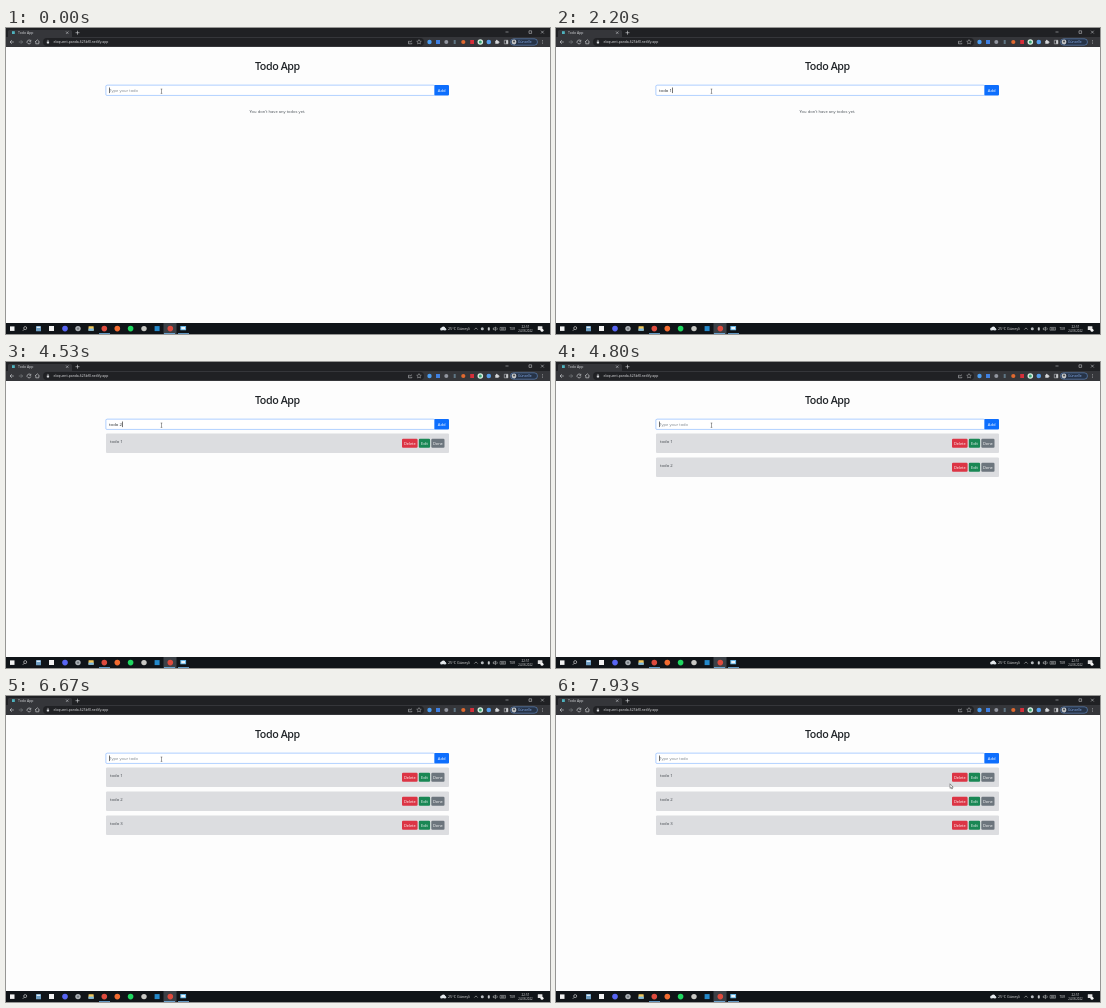
An HTML page for the animation above (8000 ms loop, 544 px wide and 306 px high).

```html
<!DOCTYPE html>
<html lang="en">
<head>
<meta charset="utf-8">
<title>Todo App</title>
<style>
  html, body { margin: 0; width: 100%; height: 100%; overflow: hidden; background: #fdfdfd; }
  svg { display: block; width: 100vw; height: 100vh; }
  text { font-family: "Open Sans", "Noto Sans", sans-serif; white-space: pre; }
</style>
</head>
<body>
<svg id="stage" viewBox="0 0 544 306"></svg>
<script>
const LOOP = 8000;
const STEP = 1000 / 15;

const rect = (x, y, w, h, fill, r = 0, more = '') =>
  `<rect x="${x}" y="${y}" width="${w}" height="${h}" rx="${r}" fill="${fill}" ${more}/>`;
const dot = (x, y, r, fill, more = '') => `<circle cx="${x}" cy="${y}" r="${r}" fill="${fill}" ${more}/>`;
const line = (d, color, w = .6) => `<path d="${d}" fill="none" stroke="${color}" stroke-width="${w}"/>`;
const label = (x, y, s, size, fill, more = '') =>
  `<text x="${x}" y="${y}" font-size="${size}" fill="${fill}" ${more}>${s}</text>`;
const mid = 'text-anchor="middle"';

function browserBar() {
  const ink = '#d5d7da';
  return rect(0, 0, 544, 19, '#202124') +
    `<path d="M2 9.5V3.5Q2 2 3.5 2H64.500Q66 2 66 3.500V9.500Z" fill="#35363a"/>` +
    rect(0, 9, 544, 10, '#35363a') +
    rect(37, 10, 381, 8, '#202124', 4) +
    rect(6, 3.2, 2.8, 2.800, '#4fb3bf') +
    label(12, 6.1, 'Todo App', 3.5, ink) +
    line('M60 3.500l2.400 2.400m0 -2.400l-2.400 2.400', ink, .5) +
    line('M69.500 4.700h4m-2 -2v4', ink, .6) +
    line('M499.500 4h3', ink, .5) +
    line('M523 2.800h2.600v2.600h-2.600z', ink, .5) +
    line('M535 2.700l2.800 2.800m0 -2.800l-2.800 2.800', ink, .5) +
    // navigation
    line('M7.800 14H4m1.800 -1.800L4 14l1.800 1.800', ink) +
    line('M12.800 14h3.800m-1.800 -1.800l1.800 1.800l-1.800 1.800', '#85888c') +
    line('M24.600 13a1.900 1.900 0 1 0 .2 1.500M24.800 11.800v1.500h-1.500', ink) +
    line('M29 14l2.300 -2.200l2.300 2.200M29.800 13.500v2.300h3v-2.300', ink) +
    rect(40.8, 13.4, 2.300, 2, ink, .3) + line('M41.300 13.500v-.7a.65 .65 0 0 1 1.300 0v.7', ink, .4) +
    label(47.5, 15.2, 'eloquent-panda-625bf0.netlify.app', 3.4, '#e4e5e7') +
    line('M403.800 13.300h-1.300v2.500h3.300v-1M404 14.500q.3 -1.500 2 -1.600', ink, .5) +
    `<path d="M413 11.600l.7 1.500l1.600 .2l-1.200 1.100l.3 1.600l-1.400 -.8l-1.400 .8l.3 -1.600l-1.200 -1.100l1.600 -.2z" fill="none" stroke="${ink}" stroke-width=".4"/>` +
    // extensions
    dot(423.5, 14, 2.2, '#4b9df0') + rect(430, 12, 4, 4, '#3f7fe0') +
    dot(440.3, 14, 2, '#9296a0') + rect(447.7, 12, 2, 4, '#5f7684') +
    dot(457.3, 14, 2.1, '#e0692f') + rect(464.2, 12, 3.8, 4, '#d62f3a') +
    dot(474.3, 14, 2.8, '#d9efe4') + dot(474.3, 14, 1.5, '#3ba676') +
    dot(482.8, 14, 2.300, '#559be8') +
    rect(489.3, 12.8, 3.300, 3, ink, .4) + dot(490.8, 12.5, .8, ink) + dot(492.8, 14.300, .7, ink) +
    line('M498.300 12.300h3.600v3.500h-3.600z', ink, .5) + rect(500.2, 12.300, 1.7, 3.5, ink) +
    rect(504.5, 10.8, 27, 6.400, '#263347', 3.200, 'stroke="#6e9fe0" stroke-width=".5"') +
    dot(508, 14, 2.4, '#c4c6c8') + dot(508, 13.500, 1, '#4a4c50') +
    label(512, 15.2, 'Güncelle', 3.4, '#8ab4f8') +
    [12.4, 14, 15.6].map(y => dot(536.5, y, .45, ink)).join('');
}

function taskbar() {
  const ink = '#e2e2e2';
  return rect(0, 295, 544, 11, '#101418') +
    rect(157.5, 295, 13, 11, '#3b4046') +
    [93, 158, 172].map(x => rect(x, 305.2, 11, .8, '#76b9ed')).join('') +
    rect(4, 298.4, 4.5, 4.5, '#f2f2f2') +
    dot(19.2, 300.1, 1.5, 'none', `stroke="${ink}" stroke-width=".6"`) + line('M18.100 301.300l-1.300 1.500', ink) +
    rect(30, 298, 5, 5.200, '#6f9fc4', .5) + rect(30.7, 298.7, 3.600, 1.300, '#dcebf5') +
    rect(43, 298, 5, 5, '#f1f1f1') +
    dot(59, 300.600, 2.800, '#5865f2') +
    dot(72, 300.600, 2.700, '#aeb3b7') + dot(72, 300.600, 1.200, '#737a80') +
    rect(82.500, 298.3, 5.2, 4.500, '#f0c65a', .4) + rect(82.500, 300.600, 5.2, 2.200, '#79b9e8') +
    dot(98.300, 300.600, 2.800, '#dd4b3e') +
    dot(111.3, 300.600, 2.800, '#f26b2f') +
    dot(124.600, 300.600, 2.800, '#1ed760') +
    dot(138, 300.600, 2.700, '#c9c9c5') +
    rect(148.600, 298.1, 5, 5, '#2489ca') +
    dot(164.300, 300.600, 2.800, '#dd4b3e') +
    rect(174.3, 298, 5.8, 4.200, '#65b7e8', .3) + rect(175.300, 299, 3.800, 2.300, '#edf5fa') +
    // tray
    dot(435.600, 301, 1.500, '#dce2e7') + dot(437.400, 300.300, 1.900, '#e8ecef') + dot(438.900, 301.200, 1.300, '#dce2e7') +
    label(442, 302.2, '25°C Güneşli', 3.7, ink) +
    line('M468.300 301.600l1.700 -1.700l1.700 1.700', ink, .5) +
    dot(476.300, 300.800, 1.500, '#b9bdc1') +
    rect(481.800, 299.2, 2, 3.2, '#c6c9cb', .7) +
    line('M487.300 300v1.600h1l1.200 1v-3.600l-1.200 1zM490.700 299.500q1 1.300 0 2.600', ink, .5) +
    line('M494 299.400h5.500v2.800h-5.500zM495 300.300h3.500m-3.500 1h3.500', ink, .4) +
    label(506.300, 302, 'TUR', 3, ink, mid) +
    label(519.500, 299.5, '22:51', 3.1, ink, mid) +
    label(519.500, 304, '24.08.2022', 2.8, ink, mid) +
    rect(531.800, 298.300, 4.600, 3.800, ink, .3) + dot(536, 302.3, 1.500, '#f7f7f7');
}

function button(x, y, w, s, fill) {
  return rect(x, y, w, 9, fill, 1.1) + label(x + w / 2, y + 5.9, s, 3.9, '#fff', mid);
}

function todoRow(i) {
  const y = 71.500 + 24 * i;
  return `<g class="row">` + rect(100, y, 343, 19.5, '#dcdde0', 1.1) +
    label(104, y + 9.7, `todo ${i + 1}`, 4.25, '#41464b') +
    button(396, y + 5.3, 15.6, 'Delete', '#dc3545') +
    button(412.800, y + 5.3, 11.300, 'Edit', '#198754') +
    button(425.300, y + 5.3, 13.200, 'Done', '#6c757d') + `</g>`;
}

const stage = document.getElementById('stage');
stage.innerHTML = rect(0, 0, 544, 306, '#fdfdfd') + browserBar() +
  label(271.4, 42.3, 'Todo App', 10.7, '#212529', mid + ' font-weight="600" letter-spacing="-.4"') +
  rect(99.6, 56.7, 329.4, 11.2, '#c2dbfe', 1.6) +
  rect(100, 57.200, 328.5, 10.200, '#fff', 1, 'stroke="#86b7fe" stroke-width=".5"') +
  `<path d="M428.500 57H441.900Q443 57 443 58.100V66.400Q443 67.500 441.900 67.500H428.500Z" fill="#0d6efd"/>` +
  label(435.700, 63.8, 'Add', 4.2, '#fff', mid) +
  label(103.3, 63.8, 'Type your todo', 4.1, '#7b838a', 'id="hint"') +
  label(103.1, 63.8, '', 4.25, '#212529', 'id="typed"') +
  rect(0, 59.500, .6, 5.600, '#111', 0, 'id="caret"') +
  label(271.5, 85, "You don't have any todos yet.", 4.1, '#495057', mid + ' id="empty"') +
  [0, 1, 2].map(todoRow).join('') + taskbar() +
  `<g id="beam">${line('M-.8 -2.200h1.600m-.8 0v4.400m-.8 0h1.600', '#333', .45)}</g>` +
  `<path id="arrow" d="M0 0V4.600L1.100 3.600L1.800 5.200L2.500 4.900L1.800 3.400H3.200Z" fill="#fff" stroke="#111" stroke-width=".4"/>`;

const [hint, typed, caret, empty, beam, arrow] =
  ['hint', 'typed', 'caret', 'empty', 'beam', 'arrow'].map(id => document.getElementById(id));
const rows = [...document.querySelectorAll('.row')];
const show = (el, on) => el.setAttribute('visibility', on ? 'visible' : 'hidden');
const move = (el, x, y) => el.setAttribute('transform', `translate(${x} ${y})`);

// Key times for each entry, then the moment it is added.
const entries = [
  { keys: [1000, 1200, 1600, 1800, 1930, 2200], add: 2670 },
  { keys: [3670, 3870, 4070, 4200, 4330, 4530], add: 4800 },
  { keys: [5530, 5730, 5930, 6070, 6200, 6400], add: 6670 }
];
const keyTimes = entries.flatMap(e => e.keys);

function draw(t) {
  const count = entries.filter(e => t >= e.add).length;
  const entry = entries[count];
  const length = entry ? entry.keys.filter(k => t >= k).length : 0;
  typed.textContent = `todo ${count + 1}`.slice(0, length);
  show(hint, !length);
  show(empty, !count);
  rows.forEach((row, i) => show(row, i < count));

  // Each key press restarts the caret's blink.
  const lastKey = keyTimes.reduce((last, k) => t >= k ? k : last, -60);
  caret.setAttribute('x', length ? 103.2 + typed.getComputedTextLength() : 103.2);
  show(caret, Math.floor((t - lastKey) / 532) % 2 === 0);

  const u = Math.min(1, Math.max(0, Math.floor((t - 7400 + 4) / STEP) / 8));
  const ease = u * u * (3 - 2 * u);
  const x = 155.500 + 238.500 * ease, y = 63.2 + 24.600 * ease;
  const overInput = y < 68;
  show(beam, overInput);
  show(arrow, !overInput);
  move(overInput ? beam : arrow, x, y);
}

function tick() {
  draw(performance.now() % LOOP);
  requestAnimationFrame(tick);
}
tick();
</script>
</body>
</html>
```
